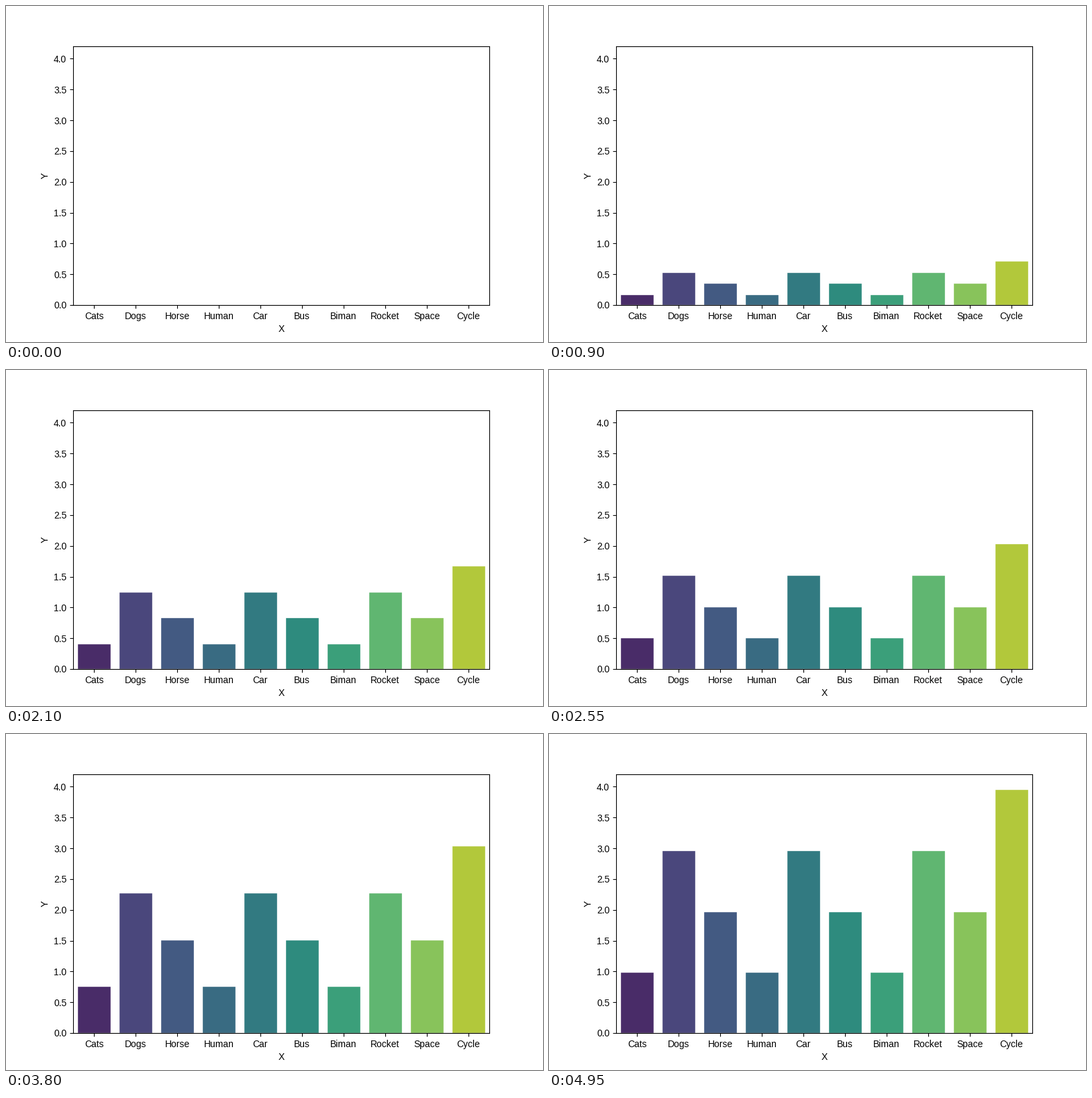
These frames come from a looping animation (800 px wide and 500 px high, 5 s). A matplotlib script:

```python
import colorsys

import matplotlib.pyplot as plt
import numpy as np
from matplotlib.animation import FuncAnimation

FRAMES = 100
INTERVAL = 50
LABELS = ["Cats", "Dogs", "Horse", "Human", "Car",
          "Bus", "Biman", "Rocket", "Space", "Cycle"]
VALUES = [1, 3, 2, 1, 3, 2, 1, 3, 2, 4]


def soften(rgb, amount=0.75):
    """Return the colour with its saturation scaled down."""
    h, l, s = colorsys.rgb_to_hls(*rgb)
    return colorsys.hls_to_rgb(h, l, s * amount)


def bar_colors(n):
    stops = np.linspace(0, 1, n + 2)[1:-1]
    return [soften(plt.cm.viridis(t)[:3]) for t in stops]


plt.rcParams["font.family"] = "Liberation Sans"
plt.rcParams["font.size"] = 10

fig, ax = plt.subplots(figsize=(8, 5), dpi=100)
fig.subplots_adjust(left=0.125, right=0.9, bottom=0.11, top=0.88)

bars = ax.bar(range(len(LABELS)), np.zeros(len(LABELS)), width=0.8,
              color=bar_colors(len(LABELS)), edgecolor="white", linewidth=1)

ax.set_xlim(-0.5, len(LABELS) - 0.5)
ax.set_ylim(0, 4.2)
ax.set_xticks(range(len(LABELS)), LABELS)
ax.set_yticks(np.arange(0, 4.1, 0.5))
ax.set_xlabel("X")
ax.set_ylabel("Y")


def update(frame):
    for bar, value in zip(bars, VALUES):
        bar.set_height(value * frame / FRAMES)
    return list(bars)


anim = FuncAnimation(fig, update, frames=FRAMES, interval=INTERVAL,
                     repeat=True, repeat_delay=0)
plt.show()
```
